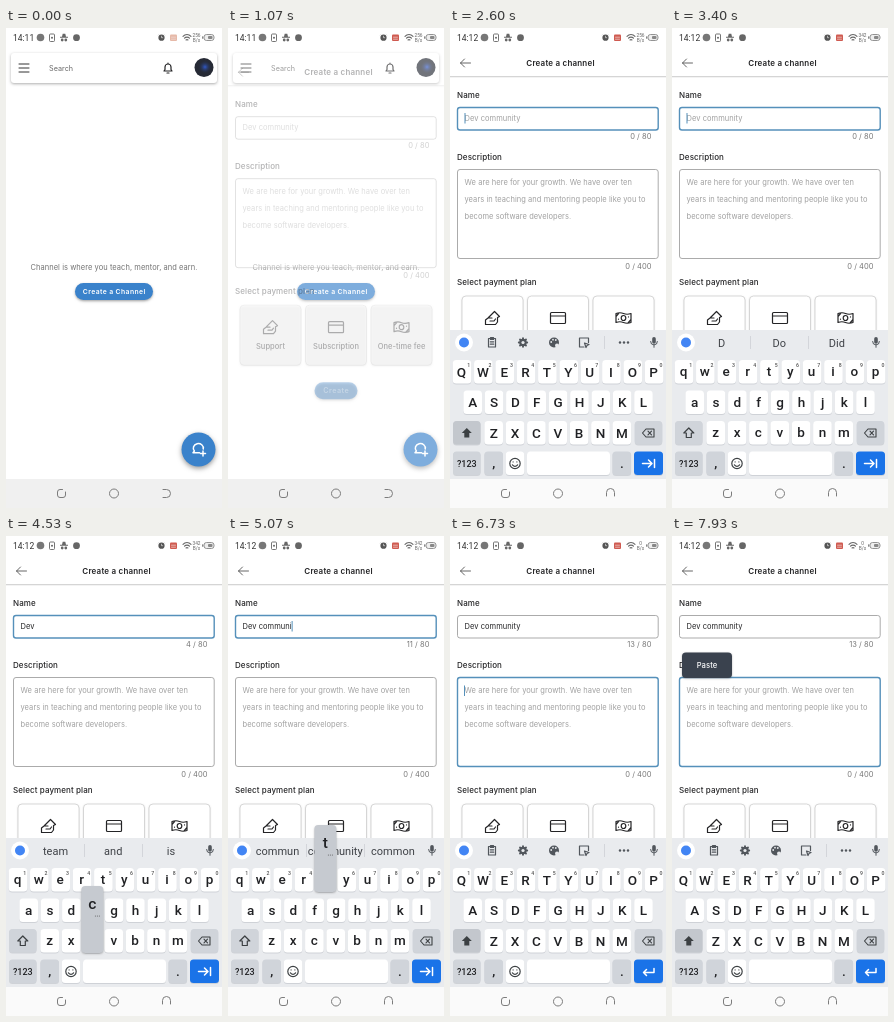
Animation of 216 by 480 pixels, one loop 8 s. Source, as an HTML page with a canvas:

```html
<!DOCTYPE html>
<html lang="en">
<head>
<meta charset="utf-8">
<title>Create a channel</title>
<style>
html, body { margin: 0; width: 100%; height: 100%; overflow: hidden; background: #fff; }
canvas { display: block; width: 216px; height: 480px; }
</style>
</head>
<body>
<canvas id="stage"></canvas>
<script>
const W = 216, H = 480, LOOP = 8000;
const canvas = document.getElementById('stage');
const ratio = window.devicePixelRatio || 1;
canvas.width = W * ratio;
canvas.height = H * ratio;
const c = canvas.getContext('2d');

const BLUE = '#3a82cb', FOCUS = '#5590ba', INK = '#242426', HINT = '#a0a0a0';
const APP = 'Inter, sans-serif', SYS = 'Roboto, sans-serif';

const clamp = v => Math.max(0, Math.min(1, v));
const progress = (t, from, to) => clamp((t - from) / (to - from));
const easeOut = p => 1 - (1 - p) ** 3;
const within = (t, ranges) => ranges.some(([a, b]) => t >= a && t < b);
const latest = (t, steps) => steps.reduce((value, [at, v]) => t >= at ? v : value, steps[0][1]);

function text(s, x, y, { size = 7.5, color = INK, weight = 400, font = APP, align = 'left', gap = 0.05 } = {}) {
  c.font = `${weight} ${size}px ${font}`;
  c.letterSpacing = gap + 'px';
  c.textAlign = align;
  c.fillStyle = color;
  c.fillText(s, x, y);
}

function box(x, y, w, h, r, fill, stroke, line = 1) {
  c.beginPath();
  c.roundRect(x, y, w, h, r);
  if (fill) { c.fillStyle = fill; c.fill(); }
  if (stroke) { c.strokeStyle = stroke; c.lineWidth = line; c.stroke(); }
}

function disc(x, y, r, fill) {
  c.beginPath();
  c.arc(x, y, r, 0, Math.PI * 2);
  c.fillStyle = fill;
  c.fill();
}

function icon(d, x, y, { color = INK, line = 1, fill = false, turn = 0 } = {}) {
  c.save();
  c.translate(x, y);
  c.rotate(turn);
  c.lineCap = c.lineJoin = 'round';
  c.lineWidth = line;
  c.strokeStyle = c.fillStyle = color;
  const p = new Path2D(d);
  fill ? c.fill(p) : c.stroke(p);
  c.restore();
}

function shadowed(blur, dy, alpha, draw) {
  c.save();
  c.shadowColor = `rgba(0,0,0,${alpha})`;
  c.shadowBlur = blur * ratio;
  c.shadowOffsetY = dy * ratio;
  draw();
  c.restore();
}

const ICONS = {
  menu: 'M-5-4H5M-5 0H5M-5 4H5',
  bell: 'M-4 3H4L3 1.5V-1A3 3 0 0 0-3-1V1.5ZM0-4V-5M-1 5H1',
  back: 'M5 0H-5M-1-4L-5 0L-1 4',
  chat: 'M1.5 3.7H-5L-3.6 2A5 4.6 0 1 1 5.2 0M5 2V7M2.5 4.5H7.5',
  hand: 'M-7 6.5V2L-4.5 0H-.5M-4-.5L2-6.5L7-1.5L5-.5V4L3 6.5H-7M-2.5 3H1.5L3 1',
  card: 'M-6.5-5.5H6.5Q7.5-5.5 7.5-4.5V4.5Q7.5 5.5 6.5 5.5H-6.5Q-7.5 5.5-7.5 4.5V-4.5Q-7.5-5.5-6.5-5.5ZM-7.5-2H7.5',
  cash: 'M-7.5-4.5Q-3.5-6 0-4.5T7.5-4.5V4.5Q3.5 6 0 4.5T-7.5 4.5ZM-2.3 0A2.3 2.5 0 1 0 2.3 0A2.3 2.5 0 1 0-2.3 0M-7.5-1.5L-4.5-4.8M7.5 1.5L4.5 4.8M-5 1V1.2M5-1V-1.2',
  clipboard: 'M-3.5-4H3.5V4.5H-3.5ZM-1.5-5H1.5V-3H-1.5ZM-1.7-.7H1.7M-1.7 1.7H1.7',
  sticker: 'M4.5 0V-4.5H-4.5V4.5H0M.5.5L5 2L3 3L2 5Z',
  mic: 'M0-5.5A1.8 1.8 0 0 0-1.8-3.7V-.5A1.8 1.8 0 0 0 1.8-.5V-3.7A1.8 1.8 0 0 0 0-5.5Z',
  micStand: 'M-3.4-1A3.4 3.4 0 0 0 3.4-1M0 2.4V4.8',
  shift: 'M0-5L5 0H2.5V4.5H-2.5V0H-5Z',
  erase: 'M-6 0L-2.5-4H5.5V4H-2.5ZM-.5-1.8L3 1.8M3-1.8L-.5 1.8',
  tab: 'M-6 0H3M0-3.5L3.5 0L0 3.5M6-4V4',
  enter: 'M5.5-3V1H-5M-2-2L-5 1L-2 4',
  recent: 'M4-1.5V1.5Q4 4 1.5 4H-1.5Q-4 4-4 1.5V-1.5Q-4-4-1.5-4H1',
  retreat: 'M-3.5-4H0A4 4 0 0 1 0 4H-3.5'
};

function statusBar(t) {
  const gray = '#666';
  text(t < 1530 ? '14:11' : '14:12', 7, 13, { size: 8.5, font: SYS, color: '#333', gap: 0 });
  disc(34.5, 9.5, 3.8, '#777');
  box(43.5, 6, 5, 7.5, 1, null, gray, 0.9);
  disc(46, 9.7, 1, gray);
  icon('M-2-1L-1.3-4H1.3L2-1H4V0H-4V-1Z', 58, 9.8, { fill: true, color: gray });
  disc(56.2, 12, 1.4, gray);
  disc(59.8, 12, 1.4, gray);
  disc(70.5, 9.7, 3.4, gray);
  disc(155.5, 9.7, 3.1, '#555');
  icon('M0-1.5V0H1.2M-3.5-2.5L-2.5-3.5M3.5-2.5L2.5-3.5', 155.5, 9.7, { color: '#ddd', line: 0.7 });
  box(164, 6.5, 7, 6.5, 1, t < 130 ? '#e6b9a8' : '#cf5a50');
  icon('M-2-.5H2M-2 1.5H2', 167.5, 9.7, { color: '#f3dcd6', line: 0.7 });
  icon('M-4-1.5A5.5 5.5 0 0 1 4-1.5M-2.5.4A3.4 3.4 0 0 1 2.5.4M-1 2.2A1.5 1.5 0 0 1 1 2.2', 181, 9.8, { color: gray, line: 1.1 });
  const speed = latest(t, [[0, '256'], [2900, '342'], [5600, '0']]);
  const tiny = { size: 4.8, font: SYS, color: gray, align: 'center', gap: 0 };
  text(speed, 190.5, 9, tiny);
  text('B/s', 190.5, 14.3, tiny);
  box(198, 6.5, 10, 6, 2.5, '#eee', '#888', 0.9);
  box(202, 8, 4.5, 3, 1, '#888');
  box(196, 8.3, 1.3, 2.5, 0.5, '#888');
}

function pillButton(label, x, y, w, h, size, gap) {
  shadowed(2.5, 1.2, 0.35, () => box(x, y, w, h, h / 2, BLUE));
  text(label, x + w / 2 + gap / 2, y + h / 2 + size * 0.36, { size, color: '#fff', weight: 600, align: 'center', gap });
}

function home(t) {
  c.fillStyle = '#fff';
  c.fillRect(0, 0, W, H);
  shadowed(3, 1, 0.32, () => box(5, 25, 206, 30, 3, '#fff'));
  icon(ICONS.menu, 18, 40, { color: '#333' });
  text('Search', 43, 42.5, { size: 7.2, color: '#666' });
  icon(ICONS.bell, 162, 40, { line: 1.2 });
  disc(198, 39.5, 9.5, '#262a35');
  const glow = c.createRadialGradient(199, 39, 0, 199, 39, 7);
  glow.addColorStop(0, '#2f58c8');
  glow.addColorStop(1, 'rgba(38,42,53,0)');
  disc(198, 39.5, 8, glow);

  text('Channel is where you teach, mentor, and earn.', 108, 242, { color: '#737373', align: 'center' });
  pillButton('Create a Channel', 69, 255, 78, 17, 6.8, 0.4);
  const ripple = progress(t, 400, 730);
  if (ripple > 0 && ripple < 1) {
    c.save();
    c.beginPath();
    c.roundRect(69, 255, 78, 17, 8.5);
    c.clip();
    disc(108, 263.5, 8 + 36 * easeOut(ripple), `rgba(255,255,255,${0.22 * (1 - ripple ** 3)})`);
    c.restore();
  }
  shadowed(5, 2, 0.4, () => disc(192.5, 421.5, 17, BLUE));
  icon(ICONS.chat, 192, 421, { color: '#fff', line: 1.5 });
}

const KEY_START = 4470, KEY_STEP = 80, WORD = 'community';
const wordKeys = [...WORD].map((k, i) => [KEY_START + KEY_STEP * i, k]);

function typed(t) {
  const count = Math.floor((t - KEY_START) / KEY_STEP);
  if (count > 0) return 'Dev ' + WORD.slice(0, count);
  return latest(t, [[0, ''], [3470, 'D'], [3600, 'De'], [3740, 'Dev'], [3870, 'Dev ']]);
}

function field(y, h, focus) {
  box(7.5, y, 200.7, h, 2.5, '#fff', focus > 0 ? FOCUS : '#a2a2a2', 0.9 + 0.5 * focus);
}

function planCard(x, name, glyph) {
  shadowed(2, 0.8, 0.22, () => box(x, 268, 61, 60, 4, '#fff'));
  box(x, 268, 61, 60, 4, null, '#cfcfcf', 0.8);
  icon(ICONS[glyph], x + 30.5, 290, { line: 1.2 });
  text(name, x + 30.5, 311.5, { weight: 500, align: 'center' });
}

function form(t) {
  c.fillStyle = '#fff';
  c.fillRect(0, 0, W, H);
  icon(ICONS.back, 15.5, 35, { color: '#555', line: 0.9 });
  text('Create a channel', 110.5, 38, { size: 8, weight: 600, align: 'center', gap: 0.2 });
  c.fillStyle = '#d5d5d5';
  c.fillRect(0, 48, W, 1);
  c.fillStyle = '#f3f3f3';
  c.fillRect(0, 49, W, 1);

  const label = { size: 8, weight: 500, gap: 0.1 };
  const count = { color: '#777', align: 'right' };
  const name = typed(t), inName = t >= 2130 && t < 6400;
  text('Name', 7, 70, label);
  field(79.5, 22.5, inName ? 0.2 + 0.8 * progress(t, 2130, 2330) : 0);
  text(name || 'Dev community', 14.5, 93, { color: name ? INK : HINT });
  const nameEnd = 14.5 + (name ? c.measureText(name).width : 0);
  text(name.length + ' / 80', 201.5, 110.7, count);

  text('Description', 7, 132, label);
  field(141.5, 89, progress(t, 6400, 6600));
  ['We are here for your growth. We have over ten',
   'years in teaching and mentoring people like you to',
   'become software developers.'].forEach((s, i) => text(s, 14.5, 157.3 + 16.8 * i, { color: HINT }));
  text('0 / 400', 201.5, 241, count);

  c.fillStyle = FOCUS;
  if (inName && !within(t, [[2700, 3200], [4300, 4550], [5530, 5790]])) c.fillRect(nameEnd, 85, 1, 10.5);
  if (within(t, [[6470, 7130], [7600, 7860]])) c.fillRect(14, 149.5, 1, 10.5);

  text('Select payment plan', 7, 257.2, label);
  planCard(12, 'Support', 'hand');
  planCard(77.5, 'Subscription', 'card');
  planCard(143, 'One-time fee', 'cash');
  pillButton('Create', 86.5, 345, 43, 17, 7.2, 0.5);

  const menu = progress(t, 7250, 7400);
  if (menu > 0) {
    c.save();
    c.globalAlpha *= menu;
    shadowed(2, 0.5, 0.3, () => box(10, 116.5, 50, 25.5, 4, '#3a424e'));
    text('Paste', 35, 132, { size: 7.7, color: '#fff', weight: 500, align: 'center' });
    c.restore();
  }
}

const ROWS = ['qwertyuiop', 'asdfghjkl', 'zxcvbnm'];
const ROW_X = [12, 22.7, 43.7], ROW_Y = [344, 374.5, 405, 435.5], PITCH = 21.35;
const presses = [[3250, 'D'], [3470, 'e'], [3610, 'v'], ...wordKeys];
const suggestions = [
  [3320, ['D', 'Do', 'Did']], [3530, ['De', 'Dear', 'Dead']], [3680, ['Dev', 'Device', 'Devin']],
  [3870, ['team', 'and', 'is']], [4550, ['c', 'can', 'come']], [4710, ['com', 'come', 'coming']],
  [4950, ['commun', 'community', 'common']], [5190, ['service', 'and', 'center']]
];

function key(x, y, w, fill) {
  box(x - w / 2, y - 11.6, w, 24, 3.5, '#cfd2d7');
  box(x - w / 2, y - 12, w, 23.6, 3.5, fill);
}

function toolbar(t, caps) {
  disc(14, 314.5, 9, '#fff');
  disc(14, 314.5, 5, '#4285f4');
  const color = '#51565c';
  icon(ICONS.mic, 204, 314.5, { color, fill: true });
  icon(ICONS.micStand, 204, 314.5, { color });
  c.fillStyle = '#cdd0d5';
  if (!caps) {
    c.fillRect(78, 308, 0.8, 13);
    c.fillRect(136, 308, 0.8, 13);
    latest(t, suggestions).forEach((s, i) =>
      text(s, 49.5 + 57.7 * i, 318.5, { size: 11, font: SYS, color: '#3f4247', align: 'center', gap: 0 }));
    return;
  }
  c.fillRect(154, 308, 0.8, 13);
  icon(ICONS.clipboard, 42, 314.5, { color, line: 1.2 });
  for (let i = 0; i < 8; i++) icon('M0-3V-4.2', 73, 314.5, { color, line: 1.9, turn: i * Math.PI / 4 });
  disc(73, 314.5, 3.7, color);
  disc(73, 314.5, 1.6, '#e8eaed');
  disc(104, 314.5, 5, color);
  [[-2.8, -0.5], [-1, -2.8], [1.8, -2.5]].forEach(([x, y]) => disc(104 + x, 314.5 + y, 0.9, '#e8eaed'));
  disc(107, 317.5, 2, '#e8eaed');
  icon(ICONS.sticker, 134, 314.5, { color, line: 1.2 });
  [-4, 0, 4].forEach(x => disc(174 + x, 314.5, 1.2, color));
}

function keyboard(t) {
  const rise = easeOut(progress(t, 2150, 2530));
  if (!rise) return;
  const caps = t < 3320 || t >= 6450;
  const FN = '#d0d4da', dark = '#202124';
  const letter = { size: 13.5, weight: 500, font: SYS, color: dark, align: 'center', gap: 0 };
  c.save();
  c.translate(0, 178 * (1 - rise));
  c.fillStyle = '#e9ebee';
  c.fillRect(0, 302, W, 178);
  toolbar(t, caps);

  ROWS.forEach((row, r) => [...row].forEach((k, i) => {
    const x = ROW_X[r] + PITCH * i, y = ROW_Y[r];
    key(x, y, 18.6, '#fff');
    text(caps ? k.toUpperCase() : k, x - (r ? 0 : 0.5), y + (caps ? 4.8 : 4.2), letter);
    if (!r) text(String((i + 1) % 10), x + 6.7, y - 5, { ...letter, size: 5.2, color: '#555' });
  }));

  key(16.8, ROW_Y[2], 27.5, caps ? '#c3c7cd' : FN);
  icon(ICONS.shift, 16.8, ROW_Y[2], { color: '#3c4043', fill: caps, line: 1.2 });
  key(198.5, ROW_Y[2], 27.5, FN);
  icon(ICONS.erase, 198.5, ROW_Y[2], { color: '#3c4043', line: 1.1 });

  const y = ROW_Y[3];
  key(16.8, y, 27.5, FN);
  text('?123', 16.8, y + 3.3, { ...letter, size: 9 });
  key(43.7, y, 18.6, FN);
  text(',', 43.7, y + 4, letter);
  key(65, y, 18.6, '#fff');
  icon('M-5.2 0A5.2 5.2 0 1 0 5.2 0A5.2 5.2 0 1 0-5.2 0M-2.6 1.3Q0 4.5 2.6 1.3M-1.9-1.6V-1.5M1.9-1.6V-1.5', 65, y, { color: '#3c4043', line: 1.2 });
  key(118.5, y, 83, within(t, [[3730, 3800]]) ? FN : '#fff');
  key(171.8, y, 18.6, FN);
  text('.', 171.8, y + 4, letter);
  key(198.5, y, 29, '#1a73e8');
  icon(t < 6450 ? ICONS.tab : ICONS.enter, 198.5, y, { color: '#fff', line: 1.5 });

  const press = presses.find(([at]) => t >= at && t < at + 78);
  if (press) {
    const k = press[1], r = ROWS.findIndex(row => row.includes(k.toLowerCase()));
    const x = ROW_X[r] + PITCH * ROWS[r].indexOf(k.toLowerCase()), py = ROW_Y[r];
    shadowed(2, 1, 0.25, () => box(x - 11, py - 55, 22, 67, 4, '#c6cad0'));
    text(k, x, py - 32, { ...letter, size: 15.5 });
    [3, 5, 7].forEach(dx => disc(x + dx, py - 25, 0.5, '#555'));
  }
  c.restore();
}

function navBar(t) {
  const rise = progress(t, 2150, 2530);
  const tone = Math.round(240 + 10 * rise);
  c.fillStyle = `rgb(${tone},${tone},${tone})`;
  c.fillRect(0, 451, W, 29);
  const style = { color: '#7c7c7c', line: 1 };
  icon(ICONS.recent, 55.5, 465.5, style);
  box(103.5, 461, 9, 9, 4.5, null, style.color, 1);
  icon(ICONS.retreat, 160.5, 465.5 - rise, { ...style, turn: -Math.PI / 2 * rise });
}

function draw(t) {
  c.setTransform(ratio, 0, 0, ratio, 0, 0);
  const open = easeOut(progress(t, 1050, 1210));
  if (open < 1) home(t);
  if (open > 0) {
    c.save();
    c.globalAlpha = open;
    c.translate(0, 14 * (1 - open));
    form(t);
    c.restore();
  }
  keyboard(t);
  navBar(t);
  statusBar(t);
}

const start = performance.now();
function tick() {
  draw((performance.now() - start) % LOOP);
  requestAnimationFrame(tick);
}
tick();
</script>
</body>
</html>
```
